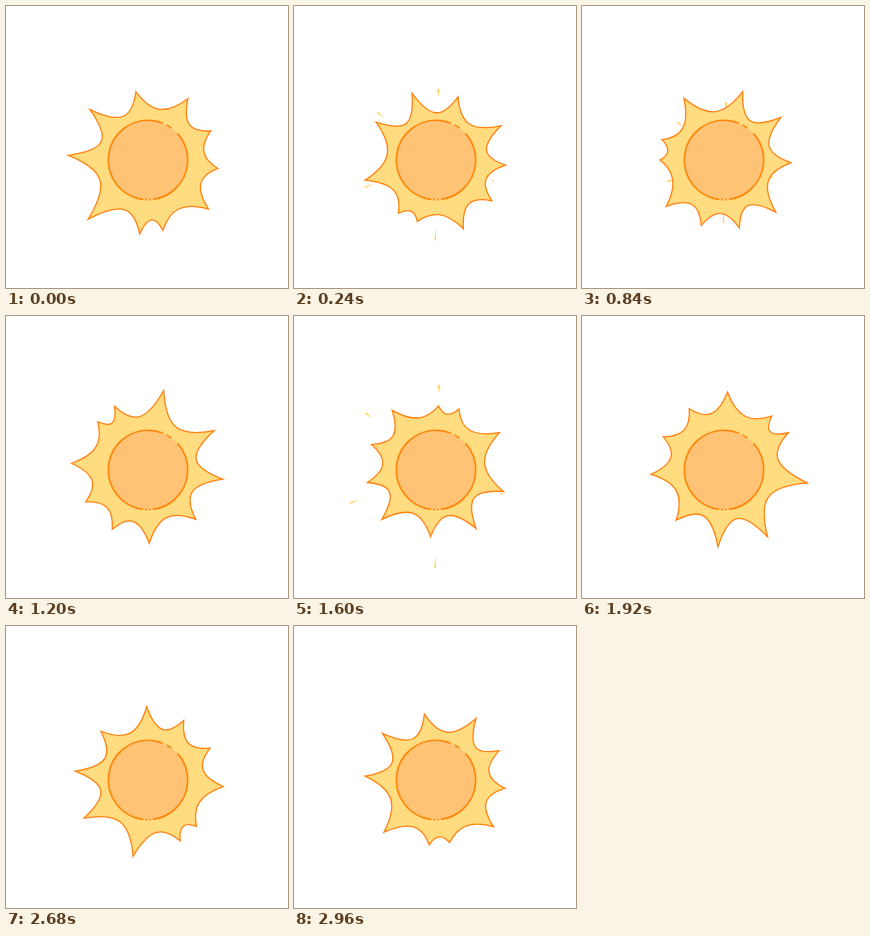
An HTML page with a canvas that plays this animation: 282x282 px, repeating every 3000 ms.

```html
<!DOCTYPE html>
<html>
<head>
<meta charset="utf-8">
<style>
html, body { margin: 0; width: 100%; height: 100%; overflow: hidden; background: #fff; }
canvas { display: block; }
</style>
</head>
<body>
<canvas id="stage" width="282" height="282"></canvas>
<script>
const ctx = document.getElementById('stage').getContext('2d');
const LOOP = 3000, STEP = 40, BEAT = 640, RAD = Math.PI / 180;
const CX = 142, CY = 154;

// Ray tips at rest: angle, radius.
const rays = [
  [80, 61], [99, 63], [138, 74], [185, 74], [221, 75],
  [258, 70], [300, 74], [332, 68], [365, 66], [399, 70]
];

// Sparks: angle, length, width, reach.
const sparks = [
  [272, 8, 3, 86], [219, 9, 2, 92], [159, 10, 2, 93], [90.5, 13, 1.8, 99], [20, 4, 1.5, 72]
];

function at(angle, r) {
  return [r * Math.cos(angle * RAD), r * Math.sin(angle * RAD)];
}

// The rays stretch once per beat, further on one side than on the other.
function drawRays(time) {
  const swell = Math.max(0, Math.cos(time / BEAT * 2 * Math.PI));
  const tips = rays.map(([a, r]) => [a, r + swell * (5 + 5.5 * Math.cos((a - 140) * RAD))]);
  ctx.save();
  ctx.rotate(time / (LOOP - STEP) * 2 * Math.PI);
  ctx.translate(3, 2.6);
  ctx.beginPath();
  ctx.moveTo(...at(...tips[0]));
  tips.forEach(([a, r], i) => {
    const [nextA, nextR] = tips[(i + 1) % tips.length];
    const gap = (nextA - a + 360) % 360;
    const valley = 51 + 3 * swell + Math.max(0, 30 - gap) * 0.3;
    const chord = (r + nextR) / 2 * Math.cos(gap / 2 * RAD);
    const pull = (valley - chord / 4) / 0.75 / Math.cos(gap * 0.2 * RAD);
    ctx.bezierCurveTo(...at(a + gap * 0.3, pull), ...at(a + gap * 0.7, pull), ...at(nextA, nextR));
  });
  ctx.closePath();
  ctx.restore();
  ctx.fillStyle = '#ffdc7f';
  ctx.fill();
  ctx.strokeStyle = '#ff8212';
  ctx.lineWidth = 1.3;
  ctx.stroke();
}

// Sparks leave from behind the rays while these are pulled in.
function drawSparks(time) {
  const k = (time % BEAT - 160) / 180;
  if (k < 0 || k > 1.15) return;
  const travel = 1 - (1 - Math.min(k, 1)) ** 2;
  ctx.fillStyle = '#fbd76c';
  for (const [angle, length, width, reach] of sparks) {
    const r = 40 + (reach - 40) * travel, half = width / 2 / r / RAD;
    ctx.beginPath();
    ctx.moveTo(...at(angle, r - length));
    ctx.lineTo(...at(angle - half, r - width / 2));
    ctx.lineTo(...at(angle, r));
    ctx.lineTo(...at(angle + half, r - width / 2));
    ctx.fill();
  }
}

function drawDisc() {
  ctx.beginPath();
  ctx.arc(0, 0, 39.7, 0, 2 * Math.PI);
  ctx.fillStyle = '#ffc375';
  ctx.fill();
  ctx.strokeStyle = '#ff870f';
  ctx.lineWidth = 1.7;
  for (const [from, to] of [[318, 443], [86, 88], [91, 94], [97, 292], [298, 306]]) {
    ctx.beginPath();
    ctx.arc(0, 0, 39.7, from * RAD, to * RAD);
    ctx.stroke();
  }
}

const start = performance.now();
function draw() {
  const time = Math.floor((performance.now() - start) % LOOP / STEP) * STEP;
  ctx.setTransform(1, 0, 0, 1, CX, CY);
  ctx.clearRect(-CX, -CY, 282, 282);
  drawSparks(time);
  drawRays(time);
  drawDisc();
  requestAnimationFrame(draw);
}
draw();
</script>
</body>
</html>
```
